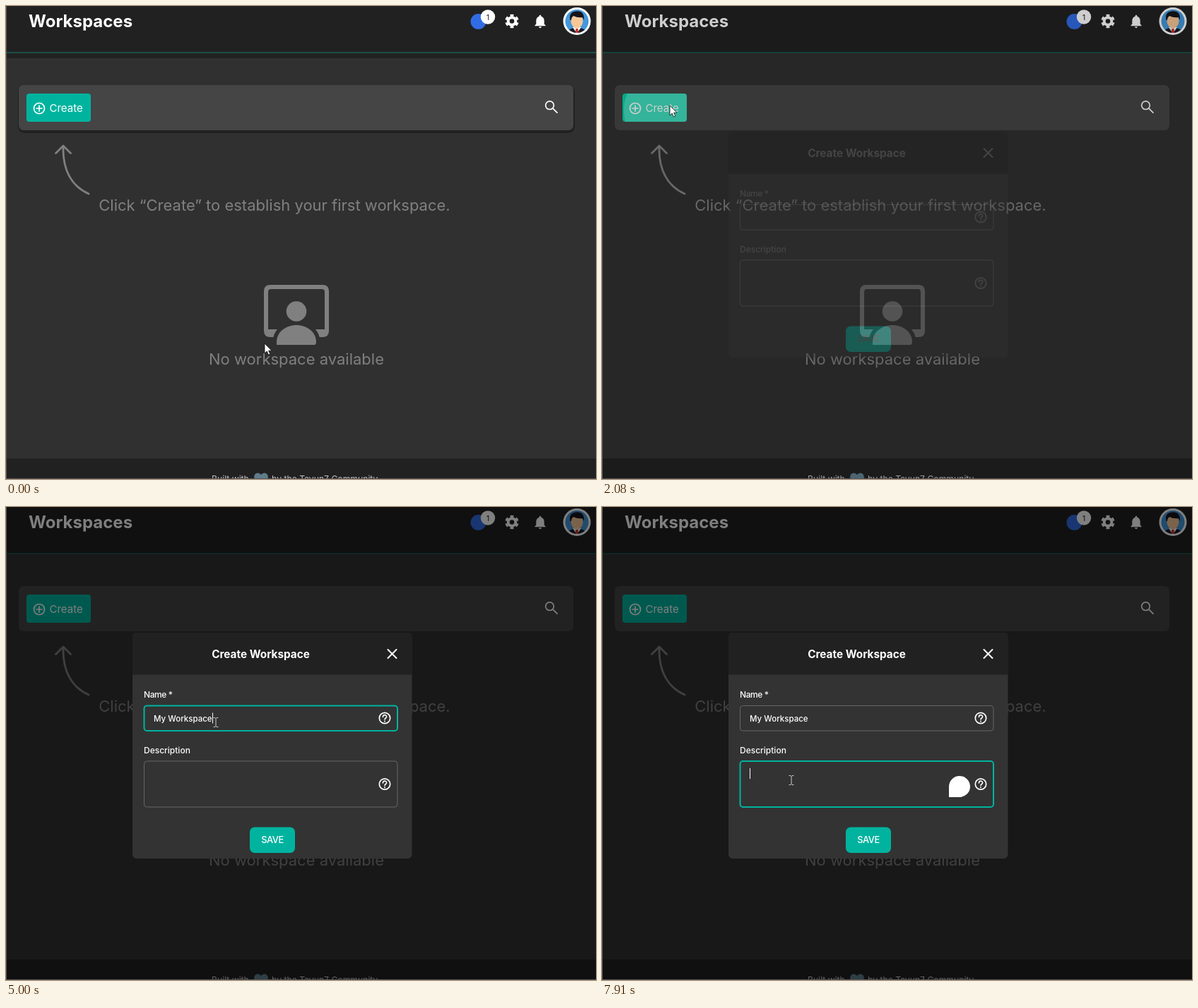
Write an HTML page that moves like this. It is 835 by 670 pixels and loops after 8 s.

```html
<!DOCTYPE html>
<html lang="en">
<head>
<meta charset="utf-8">
<title>Create a workspace</title>
<style>
  html, body { margin: 0; width: 100%; height: 100%; overflow: hidden; background: #303030; }
  svg { display: block; font-family: Inter, "Open Sans", sans-serif; }
  text { white-space: pre; }
  .line { fill: none; stroke: currentColor; stroke-linecap: round; stroke-linejoin: round; }
  .label { font-size: 12px; font-weight: 500; }
  .hint { font-size: 22px; fill: #808080; text-anchor: middle; }
  .foot { font-size: 12.2px; fill: #c4c4c4; }
</style>
</head>
<body>
<svg width="835" height="670" viewBox="0 0 835 670" color="#fff" fill="#fff">
  <defs>
    <clipPath id="buttonClip"><rect x="29" y="124" width="91" height="40" rx="4"/></clipPath>
    <clipPath id="avatarClip"><circle cx="808" cy="21.5" r="16.5"/></clipPath>
    <g id="help">
      <circle class="line" r="7.7" stroke-width="1.7"/>
      <path class="line" stroke-width="1.6" d="M-2.6-1.6C-2.6-5.3 2.7-5.2 2.6-1.8C2.5 0 0 0 0 1.9"/>
      <circle cy="4.4" r="1" fill="currentColor"/>
    </g>
  </defs>

  <!-- Page -->
  <rect width="835" height="670" fill="#303030"/>
  <rect width="835" height="66" fill="#212121"/>
  <g id="shadows" fill="#212121">
    <rect y="66" width="835" height="8"/>
    <rect x="17" y="113" width="788" height="67" rx="9"/>
  </g>
  <rect y="65" width="835" height="2" fill="#1d4d46"/>
  <text x="32" y="30" font-size="24" font-weight="700">Workspaces</text>

  <circle cx="668.5" cy="22" r="11" fill="#326ce5"/>
  <circle cx="682" cy="15.5" r="10.2"/>
  <text x="682" y="19.5" font-size="11" text-anchor="middle" fill="#222">1</text>

  <g class="line">
    <circle cx="716" cy="21.5" r="5.3" stroke-width="4"/>
    <circle cx="716" cy="21.5" r="7.8" stroke-width="4" stroke-linecap="butt"
      pathLength="12" stroke-dasharray="1.1 .9" stroke-dashoffset="-.45"/>
  </g>
  <path transform="translate(744.6 10.3) scale(.95)" d="M12 22c1.1 0 2-.9 2-2h-4c0 1.1.9 2 2 2zm6-6v-5c0-3.1-1.6-5.6-4.5-6.3V4c0-.8-.7-1.5-1.5-1.5s-1.5.7-1.5 1.5v.7C7.6 5.4 6 7.9 6 11v5l-2 2v1h16v-1l-2-2z"/>

  <circle cx="808" cy="21.5" r="19.5"/>
  <g clip-path="url(#avatarClip)">
    <rect x="790" y="4" width="36" height="36" fill="#4398dc"/>
    <path d="M794 40q1-8 10-9h8q9 1 10 9z" fill="#1b1b22"/>
    <path d="M802 30h12l-6 9z"/>
    <path d="M806.5 32h3l1 7h-5z" fill="#c8322f"/>
    <ellipse cx="808" cy="21.5" rx="8.5" ry="10" fill="#f7c797"/>
    <path d="M798.5 20Q796 9 806 7.5Q819 6 818 20L816 16Q809 17 803 14Q800 16 800 20z" fill="#15151a"/>
  </g>

  <rect x="18" y="112" width="785" height="64" rx="7" fill="#454545"/>
  <g clip-path="url(#buttonClip)">
    <rect id="button" x="29" y="124" width="91" height="40"/>
    <circle id="ripple" cx="95" cy="148"/>
  </g>
  <g class="line" stroke-width="1.7">
    <circle cx="47" cy="145" r="7.5"/>
    <path d="M43 145h8M47 141v8"/>
    <circle cx="769.5" cy="140.7" r="5.8"/>
    <path d="M774 145.2l6 6"/>
  </g>
  <text x="61.5" y="150" font-size="15">Create</text>

  <path class="line" color="#808080" stroke-width="2.8" d="M117 266C92 255 80 231 81 199M70.5 208.500L81 198L91.500 208.500"/>
  <text class="hint" x="380" y="290">Click “Create” to establish your first workspace.</text>
  <g fill="#808080">
    <path fill-rule="evenodd" d="M374 395h74q9 0 9 9v56q0 9-9 9h-74q-9 0-9-9v-56q0-9 9-9zM375 401q-4 0-4 4v53h80v-53q0-4-4-4z"/>
    <path d="M383 480v-4c0-15 14-24 28-24s28 9 28 24q0 4-3 4z" stroke="#303030" stroke-width="11" paint-order="stroke"/>
    <circle cx="411" cy="432.500" r="14.300"/>
  </g>
  <text class="hint" x="411" y="508">No workspace available</text>

  <rect y="641" width="835" height="29" fill="#212121"/>
  <text class="foot" x="291" y="674">Built with</text>
  <path d="M361 682L353 673C347 663 357 658 361 664C365 658 375 663 369 673z" fill="#5f7c8c"/>
  <text class="foot" x="376" y="674">by the Tavun7 Community</text>

  <!-- Dialog -->
  <rect id="backdrop" width="835" height="670" fill="#000"/>
  <g id="dialog" fill="currentColor">
    <rect x="179" y="178" width="395.500" height="320" rx="6" fill="#333"/>
    <path d="M179 237.500V184q0-6 6-6h383.500q6 0 6 6v53.500z" fill="#212121"/>
    <text x="360.500" y="213.500" font-size="15.300" font-weight="700" text-anchor="middle">Create Workspace</text>
    <path class="line" stroke-width="2" d="M540.500 202l12 12M552.500 202l-12 12"/>
    <text class="label" x="195" y="270" letter-spacing="-.4">Name *</text>
    <rect id="nameBox" x="195.500" y="281.500" width="358.500" height="35.500" rx="4" fill="none"/>
    <use href="#help" x="536" y="299"/>
    <text class="label" x="195" y="349">Description</text>
    <rect id="descBox" x="195.500" y="360" width="358.500" height="65" rx="4" fill="none"/>
    <path id="bubble" d="M491 411V396a15 15 0 1 1 15 15z" fill="#fff"/>
    <use href="#help" x="536" y="392.500"/>
    <rect x="345" y="453.500" width="64" height="36.500" rx="7" fill="#00b39f"/>
    <text x="377" y="475.800" font-size="12.800" font-weight="500" letter-spacing="-.4" text-anchor="middle">SAVE</text>
    <text id="typed" x="209" y="303.500" font-size="11.500" font-weight="500"></text>
    <rect id="caret" width="1" height="15"/>
  </g>

  <path d="M.5 0V670M0 669.500H835" stroke="#555"/>

  <path id="arrow" d="M0 0V14L3.200 11L5.400 16L7.800 15L5.600 10.200H10z" stroke="#111" stroke-width=".8"/>
  <path id="beam" class="line" color="#ccc" stroke-width="1" d="M-3-6.500h2l1 1l1-1h2M0-5.500v11M-3 6.500h2l1-1l1 1h2"/>
</svg>
<script>
const LOOP = 8000, NAME = "My Workspace", BLINK = 555;
const FOCUS_NAME = 3130, FOCUS_DESC = 7910, CLICK = 1920, FADE = 1980;
const $ = id => document.getElementById(id);
const clamp = v => Math.min(1, Math.max(0, v));
const smooth = v => (v = clamp(v)) * v * (3 - 2 * v);
const set = (id, attrs) => {
  for (const k in attrs) $(id).setAttribute(k, attrs[k]);
};
const show = (id, on) => set(id, { visibility: on ? "visible" : "hidden" });

// Pointer stops: time, x, y
const stops = [
  [0, 366, 478], [40, 366, 478], [180, 346, 531], [680, 346, 531],
  [1180, 87, 93], [1500, 39, 100], [1780, 39, 100], [1900, 95, 141],
  [2070, 95, 141], [2470, 382, 315], [2590, 365, 334], [2620, 365, 334],
  [2970, 297, 305], [7200, 297, 305], [7730, 268, 387], [LOOP, 268, 387]
];

// Key presses: time, characters in the field
const keys = [[FOCUS_NAME, 0], [3520, 1], [3770, 2], [3980, 3], [4190, 4]];
for (let i = 0; i < 8; i++) keys.push([4400 + i * 600 / 7, 5 + i]);
keys.push([5740, 11], [5910, 10], [6060, 9], [6150, 8]);
for (let i = 0; i < 4; i++) keys.push([6430 + i * 90, 9 + i]);

function pointerAt(t) {
  const i = stops.findIndex(s => s[0] > t);
  const [t0, x0, y0] = stops[i - 1], [t1, x1, y1] = stops[i];
  const k = smooth((t - t0) / (t1 - t0));
  return [x0 + (x1 - x0) * k, y0 + (y1 - y0) * k];
}

function outline(id, focused, hovered) {
  set(id, {
    stroke: focused ? "#00b39f" : hovered ? "#fff" : "#666",
    "stroke-width": focused ? 2 : 1
  });
}

function draw(t) {
  const [x, y] = pointerAt(t);
  const within = (l, top, r, b) => x > l && x < r && y > top && y < b;
  const fade = smooth((t - FADE) / 240);
  const open = fade > .5;
  const inName = open && within(195, 281, 555, 317);
  const inDesc = open && within(195, 360, 555, 426);
  const nameFocus = t >= FOCUS_NAME && t < FOCUS_DESC;
  const descFocus = t >= FOCUS_DESC;

  show("shadows", t < FADE);
  set("button", { fill: !open && within(29, 124, 120, 164) ? "#00d3a9" : "#00b39f" });
  set("ripple", {
    r: 80 * Math.sqrt(clamp((t - CLICK) / 250)),
    opacity: .25 * clamp((2300 - t) / 200)
  });

  set("backdrop", { opacity: fade / 2 });
  const ink = 255 * clamp((fade - .2) / .4);
  set("dialog", { opacity: fade, color: `rgb(${ink},${ink},${ink})` });
  outline("nameBox", nameFocus, inName);
  outline("descBox", descFocus, inDesc);
  show("bubble", descFocus);

  const [pressed, count] = keys.filter(k => k[0] <= t).pop() || [0, 0];
  const typed = $("typed");
  typed.textContent = NAME.slice(0, count);
  const since = t - (descFocus ? FOCUS_DESC : pressed);
  show("caret", (nameFocus || descFocus) && since % (2 * BLINK) < BLINK);
  set("caret", descFocus
    ? { x: 209, y: 370 }
    : { x: 209 + Math.round(count && typed.getComputedTextLength()), y: 291.5 });

  const place = { transform: `translate(${Math.round(x)} ${Math.round(y)})` };
  set("arrow", place);
  set("beam", place);
  show("beam", inName || inDesc);
  show("arrow", !inName && !inDesc);
}

function tick() {
  draw(performance.now() % LOOP);
  requestAnimationFrame(tick);
}
tick();
</script>
</body>
</html>
```
